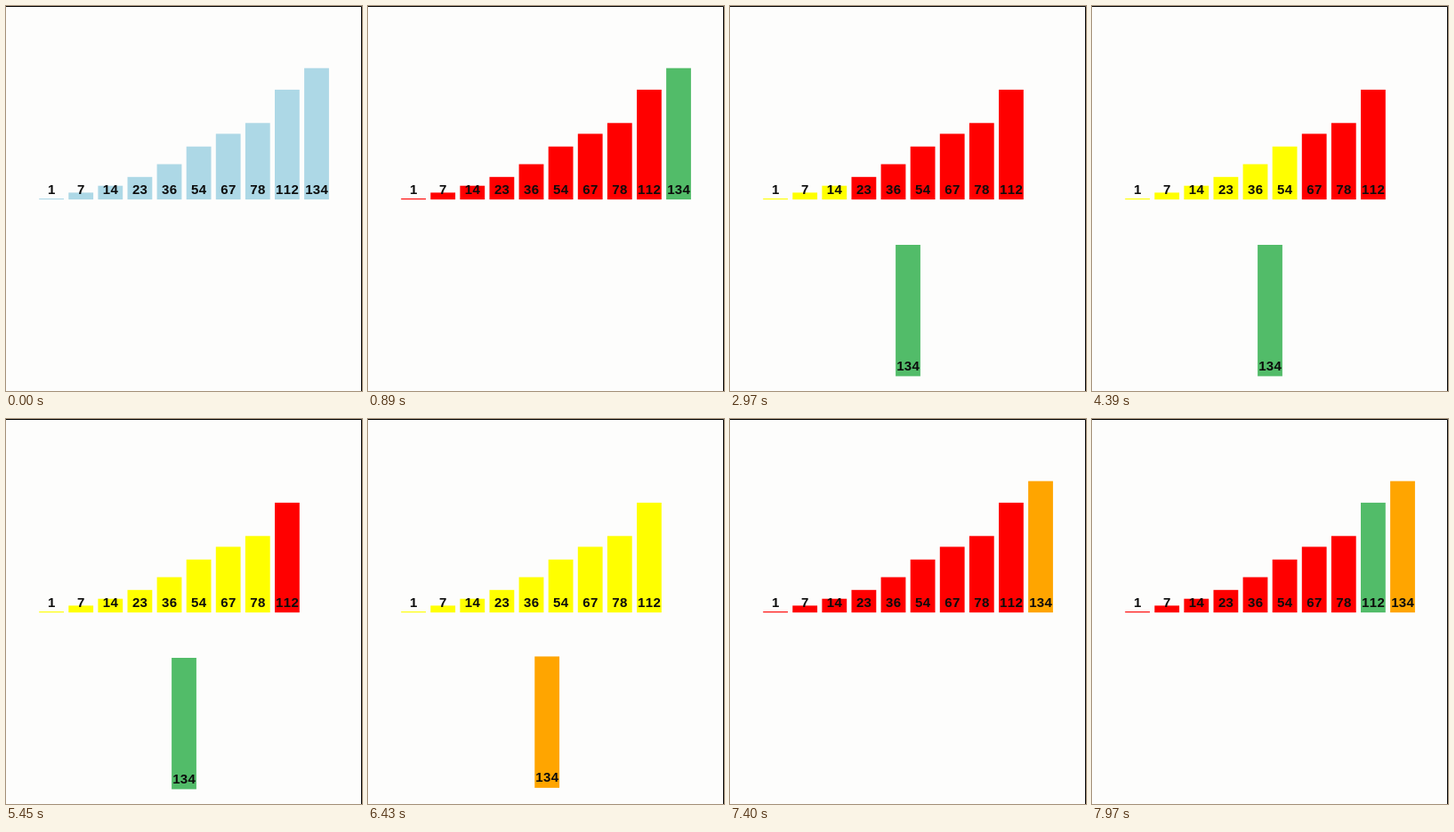
An HTML page that plays this animation: 400 by 432 pixels, repeating every 8 s.

```html
<!DOCTYPE html>
<html lang="en">
<head>
<meta charset="utf-8">
<title>Sorting bars</title>
<style>
  html, body { margin: 0; width: 100%; height: 100%; overflow: hidden; background: #fdfdfc; }
  svg { display: block; width: 400px; height: 432px; }
  text {
    font: bold 15px "Liberation Sans", Arial, sans-serif;
    font-kerning: none;
    letter-spacing: .35px;
    text-anchor: middle;
    fill: #0c0c0c;
  }
</style>
</head>
<body>
<svg id="stage" viewBox="0 0 400 432">
  <rect width="400" height="432" fill="#fdfdfc"/>
  <path d="M0 .5H399.5V432" fill="none" stroke="#000"/>
</svg>
<script>
const LOOP = 8000;
const VALUES = [1, 7, 14, 23, 36, 54, 67, 78, 112, 134];
const LAST = VALUES.length - 1;
const LEFT = 51.1, PITCH = 33.1, WIDTH = 27.8, UNIT = 1.1, BASE = 217.1;
const DROP = { x: 200, y: 415.4 };
const COLOR = { idle: '#add8e6', red: '#ff0000', key: '#52bc69', seen: '#ffff00', done: '#ffa500' };

// When each bar left of the key is visited
const VISITS = [1910, 2400, 2890, 3420, 3910, 4390, 4920, 5410, 5900];

const stage = document.getElementById('stage');

function add(parent, tag, attrs) {
  const el = document.createElementNS('http://www.w3.org/2000/svg', tag);
  for (const name in attrs) el.setAttribute(name, attrs[name]);
  return parent.appendChild(el);
}

const bars = VALUES.map(value => {
  const group = add(stage, 'g', {});
  const height = value * UNIT;
  const rect = add(group, 'rect', { x: -WIDTH / 2, y: -height, width: WIDTH, height });
  add(group, 'text', { x: 0.2, y: -6.5 }).textContent = value;
  return { group, rect };
});

function ease(u) {
  u = Math.min(1, Math.max(0, u));
  return u < 0.5 ? 4 * u ** 3 : 1 - 4 * (1 - u) ** 3;
}

// Holds the time on a coarse grid that passes through the anchor
function hold(t, anchor, size) {
  return anchor + Math.floor((t - anchor) / size) * size;
}

function keyOffset(t) {
  return t < 4000
    ? ease((hold(t, 1510, 46) - 1250) / 450)
    : 1 - ease((hold(t, 6430, 40) - 6400) / 240);
}

function colorAt(i, t) {
  if (t < 410) return COLOR.idle;
  if (i === LAST) return t < 890 ? COLOR.red : t < 6430 ? COLOR.key : COLOR.done;
  if (t < VISITS[i]) return COLOR.red;
  if (t < 6920) return COLOR.seen;
  if (t < 7400) return COLOR.idle;
  return i === LAST - 1 && t >= 7890 ? COLOR.key : COLOR.red;
}

function draw(t) {
  bars.forEach(({ group, rect }, i) => {
    const p = i === LAST ? keyOffset(t) : 0;
    const home = LEFT + PITCH * i;
    const x = home + (DROP.x - home) * p;
    const y = BASE + (DROP.y - BASE) * p;
    group.setAttribute('transform', `translate(${x} ${y})`);
    rect.setAttribute('fill', colorAt(i, t));
  });
}

const start = performance.now();
function tick() {
  draw((performance.now() - start) % LOOP);
  requestAnimationFrame(tick);
}
draw(0);
requestAnimationFrame(tick);
</script>
</body>
</html>
```
